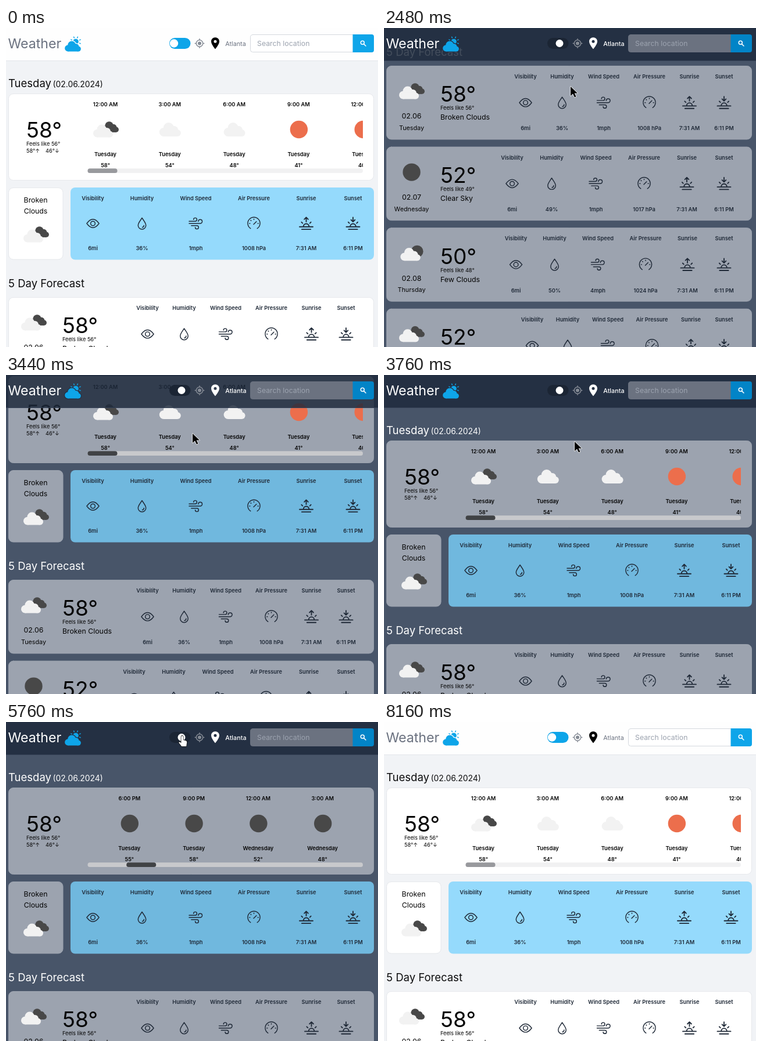
Animation of 640x550 px, one loop 8240 ms. Source, as an HTML page with a canvas:

```html
<!DOCTYPE html>
<html lang="en">
<head>
<meta charset="utf-8">
<title>Weather</title>
<style>
  html, body { margin: 0; width: 100%; height: 100%; overflow: hidden; background: #f1f3f6; }
  canvas { display: block; width: 640px; height: 550px; }
</style>
</head>
<body>
<canvas id="stage" width="640" height="550"></canvas>
<script>
const ctx = document.getElementById('stage').getContext('2d');
const LOOP = 8240, STEP = 80;
const DARK_AT = 1300, LIGHT_AT = 5860;
const INK = '#1f2937', BLACK = '#050505', BLUE = '#0ea5e9', SUN = '#ec6e4c', NIGHT = '#484848', CLOUD = '#f2f2f2';

const themes = {
  light: {
    page: '#f1f3f6', header: 'rgba(255,255,255,.9)', headerSolid: '#fefefe', edge: '#e2e5ea',
    title: '#6b7280', heading: '#0c0c0d', card: '#ffffff', border: '#e6e8ec', panel: '#95dafc',
    track: '#f1f1f2', thumb: '#98999d', pill: BLUE, pin: '#000000', place: '#6b7280', placeWeight: 400,
    input: '#ffffff', inputEdge: '#d4d8de', button: BLUE, hint: '#9ca3af'
  },
  dark: {
    page: '#485569', header: 'rgba(30,41,59,.83)', headerSolid: '#253044', edge: '#364257',
    title: '#ffffff', heading: '#ffffff', card: '#9ca3af', border: '#9ca3af', panel: '#70b8de',
    track: '#c8c9cc', thumb: '#404245', pill: '#1b2534', pin: '#ffffff', place: '#ffffff', placeWeight: 500,
    input: '#6b7280', inputEdge: '#6b7280', button: '#0284c7', hint: '#9ca3af'
  }
};
let theme = themes.light;

// Icons on a 24 unit grid
const icons = {
  eye: 'M1 12Q12-3 23 12Q12 27 1 12ZM16 12a4 4 0 1 1-8 0a4 4 0 1 1 8 0',
  drop: 'M12 2C9 7 5 11 5 15.5a7 7 0 0 0 14 0C19 11 15 7 12 2ZM15.5 15.5a3.5 3.5 0 0 1-3 3.5',
  wind: 'M0 8h11a3 3 0 1 0-3-3M0 12h20a3.5 3.5 0 1 0-3.5-3.5M4 16h10a3 3 0 1 1-3 3',
  gauge: 'M6 21A11 11 0 1 1 18 21M4 12h1M19 12h1M12 4v1M6.3 6.3l.7.7M11.5 13.5l5-5',
  sunrise: 'M0 18h24M4 22.5h16M7 17.5a5 5 0 0 1 10 0M12 9V1M8.5 4.5L12 1l3.5 3.5M3.5 9.5l2 2M20.5 9.5l-2 2',
  sunset: 'M0 18h24M4 22.5h16M7 17.5a5 5 0 0 1 10 0M12 1V9M8.5 5.5L12 9l3.5-3.5M3.5 9.5l2 2M20.5 9.5l-2 2'
};
for (const name in icons) icons[name] = new Path2D(icons[name]);
const pinShape = new Path2D('M12 2C8 2 5 5 5 9c0 5 7 13 7 13s7-8 7-13c0-4-3-7-7-7zm0 4.5a2.5 2.5 0 1 1 0 5a2.5 2.5 0 1 1 0-5z');
const arrowShape = new Path2D('M0 0V16L4 12.5L7 18.5L9.5 17.3L6.7 11.5H12Z');
const handShape = new Path2D('M-1.6 1.5a1.7 1.7 0 0 1 3.4 0V7l4.6 1.2q2 .5 1.8 2.8l-1 7h-8l-5-6.5q1-2 3.1-.3l1.1 1z');

const metrics = [['eye', 'Visibility'], ['drop', 'Humidity'], ['wind', 'Wind Speed'],
  ['gauge', 'Air Pressure'], ['sunrise', 'Sunrise'], ['sunset', 'Sunset']];

const hours = [
  ['12:00 AM', 'broken', 58], ['3:00 AM', 'cloud', 54], ['6:00 AM', 'cloud', 48], ['9:00 AM', 'sun', 41],
  ['12:00 PM', 'sun', 40], ['3:00 PM', 'sun', 47], ['6:00 PM', 'moon', 55], ['9:00 PM', 'moon', 58],
  ['12:00 AM', 'moon', 52], ['3:00 AM', 'moon', 48]
];

const days = [
  { date: '02.06', day: 'Tuesday', sky: 'broken', temp: 58, feels: 56, text: 'Broken Clouds',
    xs: [243.5, 306.5, 378, 456.5, 525.5, 585], vals: ['36%', '1mph', '1008 hPa'] },
  { date: '02.07', day: 'Wednesday', sky: 'moon', temp: 52, feels: 49, text: 'Clear Sky',
    xs: [220.5, 288.5, 364.5, 447.5, 521, 585], vals: ['49%', '1mph', '1017 hPa'] },
  { date: '02.08', day: 'Thursday', sky: 'few', temp: 50, feels: 48, text: 'Few Clouds',
    xs: [227, 293.5, 368, 450, 522, 585], vals: ['50%', '4mph', '1024 hPa'] },
  { date: '02.09', day: 'Friday', sky: 'broken', temp: 52, feels: 50, text: 'Overcast Clouds',
    xs: [255, 316, 385, 461, 528, 585], vals: ['55%', '5mph', '1022 hPa'] },
  { date: '02.10', day: 'Saturday', sky: 'broken', temp: 55, feels: 53, text: 'Overcast Clouds',
    xs: [255, 316, 385, 461, 528, 585], vals: ['60%', '4mph', '1019 hPa'] }
];

// Keyframes: time, then values
const pageScroll = [[1900, 0], [2862, 612], [2900, 612], [3642, 0]];
const hourScroll = [[3900, 0], [4330, 430], [4500, 430], [5000, 623.5], [6350, 623.5], [6850, 0]];
const pointer = [[640, 330, -24], [1120, 304, 29], [1440, 304, 29], [1840, 321, 101], [3440, 321, 101],
  [3760, 328, 115], [4000, 345, 170], [4950, 345, 170], [5520, 303, 24], [5960, 303, 24],
  [6320, 345, 170], [6750, 345, 170], [7050, -20, 160]];

const ease = p => p * p * (3 - 2 * p);

function sample(keys, t) {
  const next = keys.findIndex(k => k[0] > t);
  if (next === 0) return keys[0].slice(1);
  if (next < 0) return keys[keys.length - 1].slice(1);
  const a = keys[next - 1], b = keys[next];
  const p = ease((t - a[0]) / (b[0] - a[0]));
  return a.slice(1).map((v, i) => v + (b[i + 1] - v) * p);
}

// y is the middle of the capitals
function text(str, x, y, size, { color = BLACK, weight = 400, align = 'left' } = {}) {
  ctx.font = `${weight} ${size}px Inter, sans-serif`;
  ctx.textAlign = align;
  ctx.fillStyle = color;
  ctx.fillText(str, x, y + size * 0.364);
}

const label = (str, x, y, color = BLACK) => text(str, x, y, 9.24, { color, weight: 600, align: 'center' });

function box(x, y, w, h, radius, fill, stroke) {
  ctx.beginPath();
  ctx.roundRect(x, y, w, h, radius);
  ctx.fillStyle = fill;
  ctx.fill();
  if (stroke) {
    ctx.strokeStyle = stroke;
    ctx.lineWidth = 1;
    ctx.stroke();
  }
}

const card = (x, y, w, h) => box(x + 0.5, y + 0.5, w - 1, h - 1, 8, theme.card, theme.border);

function disc(x, y, r, color) {
  ctx.beginPath();
  ctx.arc(x, y, r, 0, Math.PI * 2);
  ctx.fillStyle = color;
  ctx.fill();
}

function cloud(x, y, s, color, grow = 0) {
  for (const [cx, cy, r] of [[-11, 4.5, 7.5], [-2.5, -3, 9], [7, 1, 7], [12.5, 6, 6]])
    disc(x + cx * s, y + cy * s, r * s + grow, color);
  ctx.fillRect(x - 11 * s, y, 23.5 * s, 12 * s + grow);
}

function sky(kind, x, y) {
  if (kind === 'sun') disc(x, y, 15.2, SUN);
  if (kind === 'moon') disc(x, y, 15.2, NIGHT);
  if (kind === 'cloud') cloud(x, y, 1, CLOUD);
  if (kind === 'few') {
    disc(x + 9.5, y - 3, 10.5, NIGHT);
    cloud(x - 2, y + 2, 0.93, CLOUD);
  }
  if (kind === 'broken') {
    cloud(x + 8, y - 4.5, 0.78, NIGHT);
    cloud(x - 4.5, y + 2.5, 0.92, CLOUD);
  }
}

function at(x, y, scale, draw) {
  ctx.save();
  ctx.translate(x, y);
  ctx.scale(scale, scale);
  draw();
  ctx.restore();
}

function lineIcon(name, x, y) {
  at(x, y, 0.96, () => {
    ctx.translate(-12, -12);
    ctx.strokeStyle = INK;
    ctx.lineWidth = name.startsWith('sun') ? 1.9 : 1.5;
    ctx.lineCap = ctx.lineJoin = 'round';
    ctx.stroke(icons[name]);
  });
}

function metricRow(xs, vals, rows) {
  const values = ['6mi', ...vals, '7:31 AM', '6:11 PM'];
  metrics.forEach(([icon, name], i) => {
    label(name, xs[i], rows[0], INK);
    lineIcon(icon, xs[i], rows[1]);
    label(values[i], xs[i], rows[2], INK);
  });
}

function today(scrolled) {
  text('Tuesday', 4, 95, 18.5, { color: theme.heading });
  text('(02.06.2024)', 80.5, 96.5, 13.86, { color: theme.heading });
  card(4, 113, 629, 150);
  text('58°', 35, 176, 37);
  text('Feels like 56°', 35, 200, 9.24);
  text('58°↑', 35, 212, 9.24);
  text('46°↓', 68, 212, 9.24);

  ctx.save();
  ctx.beginPath();
  ctx.rect(140, 114, 474, 148);
  ctx.clip();
  hours.forEach(([time, kind, temp], i) => {
    const x = 171 + i * 110.8 - scrolled;
    label(time, x, 131.5);
    sky(kind, x + 0.5, 175);
    label(i < 8 ? 'Tuesday' : 'Wednesday', x, 217.5);
    label(temp + '°', x, 236.5);
  });
  box(140.5, 242.3, 473.5, 7.7, 4, theme.track);
  box(140.5 + scrolled * 0.107, 242.3, 51, 7.7, 4, theme.thumb);
  ctx.restore();

  card(4, 275, 94.5, 124.5);
  text('Broken', 51, 297, 12.32, { align: 'center' });
  text('Clouds', 51, 315.5, 12.32, { align: 'center' });
  sky('broken', 51.5, 356);
  box(111, 275, 522, 124.5, 8, theme.panel);
  metricRow([149.5, 234, 326.5, 426.5, 516.5, 597], ['36%', '1mph', '1008 hPa'], [294, 337, 380]);
}

function forecast() {
  text('5 Day Forecast', 4, 440, 18.5, { color: theme.heading });
  days.forEach((d, i) => {
    const y = 464 + i * 139.6;
    card(4, y, 629, 127.5);
    sky(d.sky, 47.5, y + 44);
    text(d.date, 47.5, y + 87, 12.32, { align: 'center' });
    text(d.day, 47.5, y + 107, 10.78, { align: 'center' });
    text(d.temp + '°', 97, y + 49, 37);
    text(`Feels like ${d.feels}°`, 97, y + 73, 9.24);
    text(d.text, 97, y + 89, 12.32);
    metricRow(d.xs, d.vals, [y + 18.7, y + 63.7, y + 108]);
  });
}

function weatherMark() {
  ctx.strokeStyle = BLUE;
  ctx.lineWidth = 1.5;
  ctx.lineCap = 'round';
  for (let i = -3; i <= 2; i++) {
    const a = -Math.PI / 4 + (i + 0.5) * Math.PI / 4;
    ctx.beginPath();
    ctx.moveTo(120 + 7 * Math.cos(a), 23.5 + 7 * Math.sin(a));
    ctx.lineTo(120 + 8.8 * Math.cos(a), 23.5 + 8.8 * Math.sin(a));
    ctx.stroke();
  }
  disc(120, 23.5, 4.8, BLUE);
  cloud(115, 31.5, 0.75, theme.headerSolid, 1.3);
  cloud(115, 31.5, 0.75, BLUE);
}

function header(knob) {
  ctx.fillStyle = theme.header;
  ctx.fillRect(0, 0, 640, 56);
  ctx.fillStyle = theme.edge;
  ctx.fillRect(0, 56, 640, 1);
  text('Weather', 3.5, 27, 23.1, { color: theme.title });
  weatherMark();

  box(281, 17, 36.5, 19, 9.5, theme.pill);
  disc(289 + 13 * knob, 26.5, 7.2 - 0.7 * knob, '#ffffff');

  const gray = '#858b95';
  ctx.strokeStyle = gray;
  ctx.lineWidth = 1.5;
  ctx.beginPath();
  ctx.arc(333, 26.5, 5.7, 0, Math.PI * 2);
  for (const [dx, dy] of [[1, 0], [-1, 0], [0, 1], [0, -1]]) {
    ctx.moveTo(333 + dx * 6, 26.5 + dy * 6);
    ctx.lineTo(333 + dx * 7.8, 26.5 + dy * 7.8);
  }
  ctx.stroke();
  disc(333, 26.5, 3, gray);

  at(348, 14.2, 1, () => {
    ctx.fillStyle = theme.pin;
    ctx.fill(pinShape, 'evenodd');
  });
  text('Atlanta', 377.3, 27, 10.78, { color: theme.place, weight: theme.placeWeight });

  box(420.5, 11.5, 177, 30, [4, 0, 0, 4], theme.input, theme.inputEdge);
  text('Search location', 432, 27, 12.32, { color: theme.hint });
  box(596.5, 11, 36.5, 31, [0, 4, 4, 0], theme.button);
  ctx.strokeStyle = '#ffffff';
  ctx.lineWidth = 1.5;
  ctx.beginPath();
  ctx.arc(613.3, 25.3, 3, 0, Math.PI * 2);
  ctx.moveTo(615.6, 27.6);
  ctx.lineTo(619, 31);
  ctx.stroke();
}

function cursor(x, y) {
  const overToggle = Math.abs(x - 299) < 19 && Math.abs(y - 27) < 11;
  const shape = overToggle ? handShape : arrowShape;
  at(x, y, 1, () => {
    ctx.lineJoin = 'round';
    ctx.lineWidth = 1.4;
    ctx.strokeStyle = overToggle ? '#111111' : '#ffffff';
    ctx.fillStyle = overToggle ? '#ffffff' : '#000000';
    ctx.stroke(shape);
    ctx.fill(shape);
  });
}

function render(now) {
  const t = Math.floor((now % LOOP) / STEP) * STEP;
  theme = t >= DARK_AT && t < LIGHT_AT ? themes.dark : themes.light;
  const [knob] = sample([[DARK_AT, 0], [DARK_AT + 200, 1], [LIGHT_AT, 1], [LIGHT_AT + 200, 0]], t);

  ctx.fillStyle = theme.page;
  ctx.fillRect(0, 0, 640, 550);
  ctx.save();
  ctx.translate(0, -Math.round(sample(pageScroll, t)[0]));
  today(sample(hourScroll, t)[0]);
  forecast();
  ctx.restore();
  header(knob);
  cursor(...sample(pointer, t));
}

const start = performance.now();
function loop() {
  render(performance.now() - start);
  requestAnimationFrame(loop);
}
loop();
</script>
</body>
</html>
```
